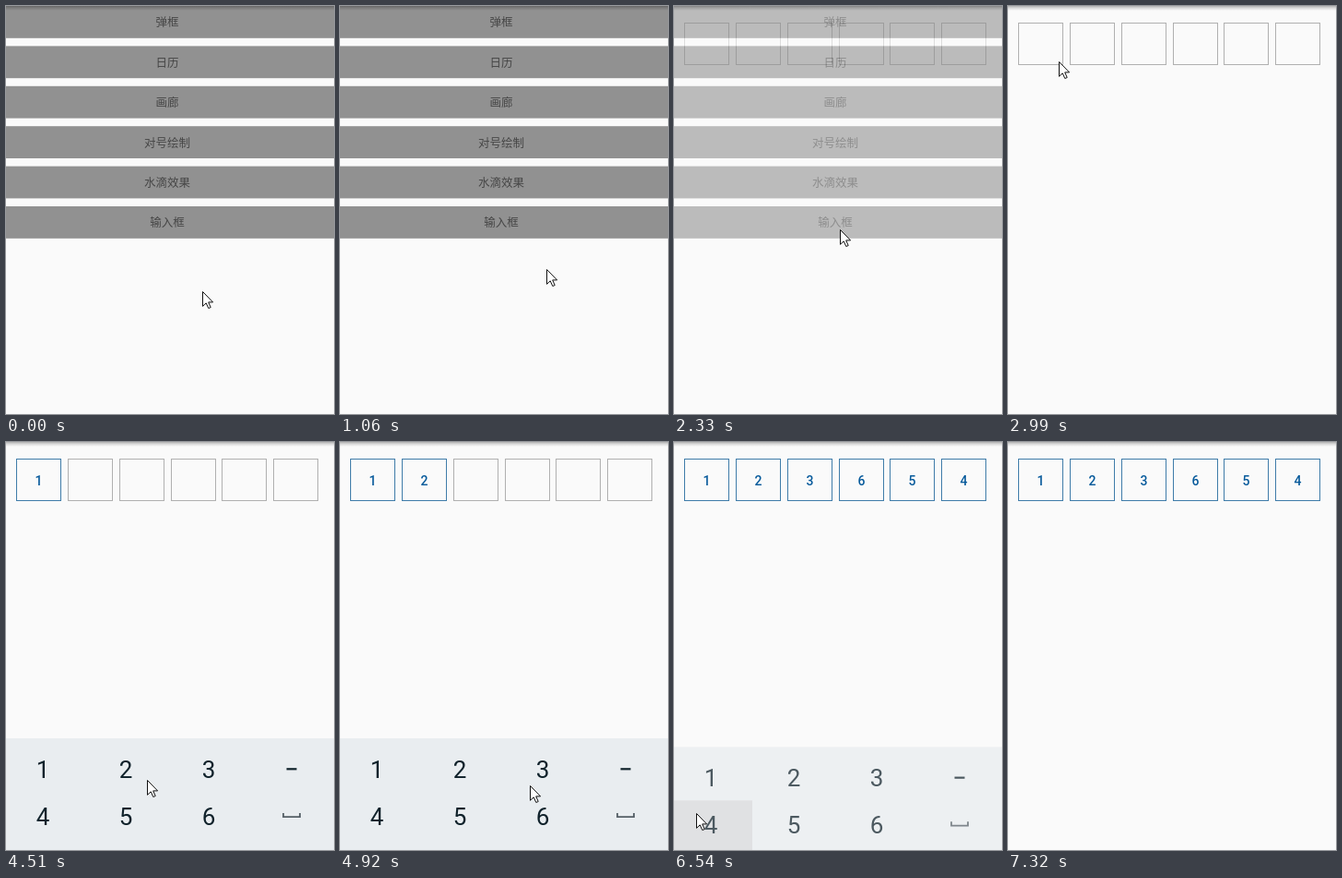
An HTML page for the animation above (8000 ms loop, 356x442 px).

```html
<!DOCTYPE html>
<html lang="zh">
<head>
<meta charset="utf-8">
<title>输入框</title>
<style>
html, body { margin: 0; width: 100%; height: 100%; overflow: hidden; background: #fafafa; }
svg { display: block; width: 356px; height: 442px; }
text { text-anchor: middle; }
#list text { font: 12.5px "Noto Sans CJK SC", "Noto Sans CJK", sans-serif; fill: #464646; }
.cell rect { fill: none; stroke: #b0b0b0; }
.cell text { font: 500 14px Roboto, sans-serif; fill: #075a9b; visibility: hidden; }
.cell.on rect { stroke: #3f7ca9; }
.cell.on text { visibility: visible; }
#keys text { font: 26px Roboto, sans-serif; fill: #10222b; }
</style>
</head>
<body>
<svg viewBox="0 0 356 442">
  <defs>
    <linearGradient id="shade" x2="0" y2="1">
      <stop stop-opacity=".3"/><stop offset=".4" stop-opacity=".14"/><stop offset="1" stop-opacity="0"/>
    </linearGradient>
  </defs>
  <rect width="356" height="442" fill="#fafafa"/>
  <g id="list"></g>
  <g id="page"><rect width="356" height="442" fill="#fafafa"/></g>
  <rect width="356" height="5" fill="url(#shade)"/>
  <g id="keys">
    <rect y="321" width="356" height="160" fill="#e9edf0"/>
    <rect id="press" y="379" width="85" height="63" fill="#d8d9dc"/>
    <path d="M304.5 354.3h11" stroke="#10222b" stroke-width="2.2"/>
    <path d="M301 402v4.2h18v-4.2" fill="none" stroke="#555f66" stroke-width="1.8"/>
  </g>
  <path id="cursor" d="M.5 .5V16.3L4.2 12.8 6.8 18.5 9.2 17.5 6.7 11.9H11.6Z" fill="#fff" stroke="#111"/>
</svg>
<script>
const $ = id => document.getElementById(id);
const LOOP = 8000;
const add = (id, html) => $(id).insertAdjacentHTML('beforeend', html);

['弹框', '日历', '画廊', '对号绘制', '水滴效果', '输入框'].forEach((label, i) => {
  const y = i * 43.4;
  add('list', `<rect y="${y}" width="356" height="34.8" fill="#919191"/><text x="175" y="${y + 22.3}">${label}</text>`);
});
[...'123654'].forEach((d, i) => {
  const x = Math.round(11 + i * 55.85) + .5;
  add('page', `<g class="cell"><rect x="${x}" y="18.5" width="48" height="45"/><text x="${x + 24}" y="47">${d}</text></g>`);
});
for (let i = 0; i < 6; i++)
  add('keys', `<text x="${40 + i % 3 * 90}" y="${i < 3 ? 363.7 : 414.7}">${i + 1}</text>`);

// The picture refreshes in bursts of [first, last, count]
const ticks = [[0, 0, 1], [500, 1510, 8], [1660, 1660, 1], [1930, 2080, 2], [2330, 2570, 3],
  [2840, 3810, 8], [3960, 4920, 8], [5040, 5410, 4], [5550, 5970, 4],
  [6120, 6400, 3], [6540, 7080, 5], [7200, 7320, 2]]
  .flatMap(([a, b, n]) => Array.from({ length: n }, (_, i) => n > 1 ? a + (b - a) * i / (n - 1) : a));

const pointer = [[0, 213, 309], [400, 213, 309], [800, 230, 296], [1200, 212, 264], [1510, 188, 242],
  [1660, 182, 242], [1930, 180, 242], [2330, 180, 242], [2570, 146, 140], [2840, 80, 74],
  [2970, 55, 60], [3000, 55, 60], [3120, 44, 47], [3260, 44, 50], [3400, 60, 120],
  [3670, 62, 300], [3810, 46, 358], [3960, 48, 360], [4100, 56, 362], [4500, 153, 366],
  [4650, 148, 366], [4920, 206, 372], [5040, 214, 370], [5287, 226, 400], [5410, 230, 412],
  [5560, 230, 412], [5830, 138, 408], [5970, 126, 406], [6260, 45, 402], [6400, 24, 402],
  [6680, 24, 402], [7080, 217, 401], [7200, 250, 423]];
const pageFade = [[2250, 0], [2450, 1]];
const keysFade = [[3320, 0], [3540, 1], [6400, 1], [6540, .74], [6660, 0]];
const typed = [3960, 4640, 5040, 5400, 5830, 6390];

function at(track, t) {
  const i = track.findIndex(k => k[0] > t);
  if (i < 1) return track.at(i).slice(1);
  const a = track[i - 1], b = track[i], u = (t - a[0]) / (b[0] - a[0]);
  return a.slice(1).map((v, j) => v + (b[j + 1] - v) * u);
}

const cells = document.querySelectorAll('.cell');
function draw(now) {
  const clock = now % LOOP;
  const t = ticks.findLast(k => k <= clock);
  const [shown] = at(keysFade, t), [x, y] = at(pointer, t);
  $('page').setAttribute('opacity', at(pageFade, t)[0]);
  $('keys').setAttribute('opacity', shown);
  $('keys').setAttribute('transform', `translate(0 ${(1 - shown) * 36})`);
  $('press').setAttribute('opacity', +(t >= 6390));
  cells.forEach((c, i) => c.classList.toggle('on', t >= typed[i]));
  $('cursor').setAttribute('transform', `translate(${Math.round(x)} ${Math.round(y)})`);
  $('cursor').setAttribute('opacity', +(t < 7320));
}

const start = performance.now();
(function frame() {
  draw(performance.now() - start);
  requestAnimationFrame(frame);
})();
</script>
</body>
</html>
```
